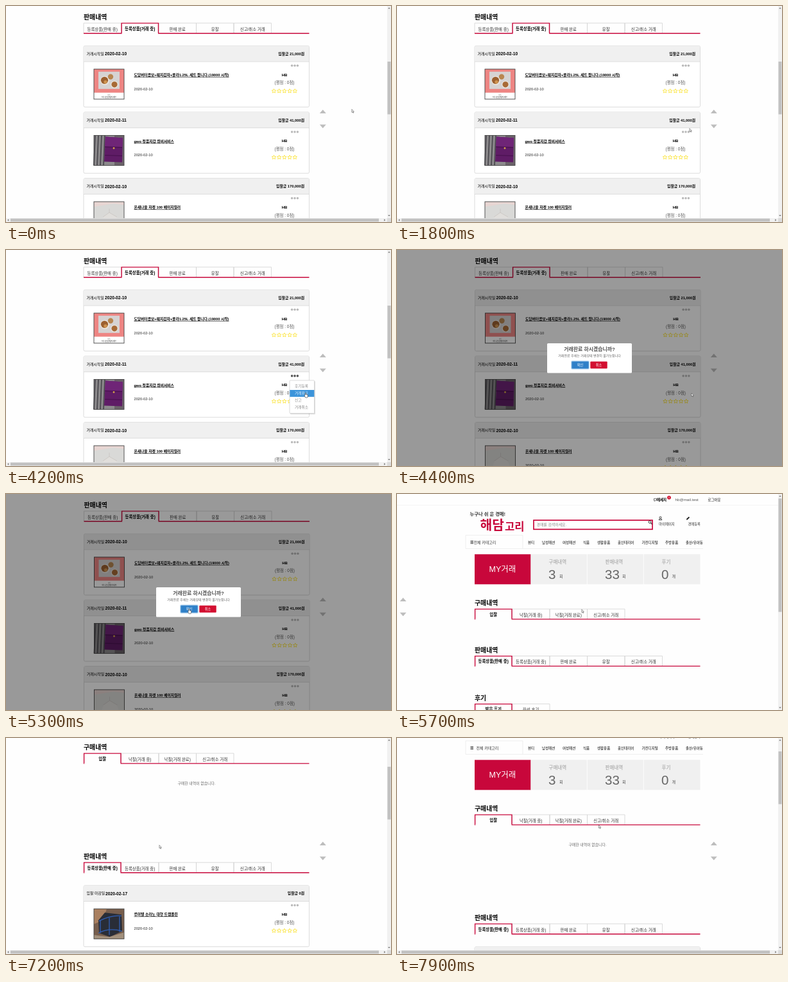
Write an HTML page that moves like this. It is 600 by 338 pixels and loops after 8000 ms.

```html
<!DOCTYPE html>
<html lang="ko">
<head>
<meta charset="utf-8">
<title>거래 완료</title>
<style>
  html, body { margin: 0; width: 100%; height: 100%; overflow: hidden; background: #fefefe; }
  svg { display: block; width: 100vw; height: 100vh; font-family: "Liberation Sans", "Noto Sans CJK KR", "Noto Sans CJK", sans-serif; }
  text { white-space: pre; }
</style>
</head>
<body>
<svg id="stage" viewBox="0 0 600 338" preserveAspectRatio="none"></svg>
<script>
const RED = '#c8073b';
const BOLD = 'font-weight="700"';
const MID = 'text-anchor="middle"';
const END = 'text-anchor="end"';
const LOOP = 8000;

// ---- drawing helpers (y is the visual middle of a text line) ----
const fill = color => `fill="${color}"`;
const text = (s, x, y, size, attrs = '') =>
  `<text x="${x}" y="${y + size * 0.37}" font-size="${size}" ${attrs}>${s}</text>`;
const rect = (x, y, w, h, color, attrs = '') =>
  `<rect x="${x}" y="${y}" width="${w}" height="${h}" fill="${color}" ${attrs}/>`;
const path = (d, color, attrs = '') => `<path d="${d}" fill="${color}" ${attrs}/>`;
const line = (d, color, width = 1) => path(d, 'none', `stroke="${color}" stroke-width="${width}"`);
const circle = (x, y, r, color, attrs = '') => `<circle cx="${x}" cy="${y}" r="${r}" fill="${color}" ${attrs}/>`;
const group = (id, body, attrs = '') => `<g id="${id}" ${attrs}>${body}</g>`;
const dots = (y, color) => [445.6, 450, 454.4].map(x => circle(x, y, 1.75, color)).join('');

function star(cx, cy, r) {
  const points = Array.from({ length: 10 }, (_, i) => {
    const a = i * Math.PI / 5, k = i % 2 ? r * 0.48 : r;
    return `${(cx + k * Math.sin(a)).toFixed(2)},${(cy - k * Math.cos(a)).toFixed(2)}`;
  });
  return `<polygon points="${points.join(' ')}" fill="#fffef2" stroke="#fae12a" stroke-width=".8"/>`;
}

// ---- page sections ----
function tabs(title, y, labels, active) {
  const left = i => 121 + i * 58.5;
  const bottom = y + 25.4;
  const cells = labels.map((label, i) => {
    const x = left(i), on = i === active;
    return (on ? '' : line(`M${x},${bottom}V${y + 9.5}H${x + 58.5}V${bottom}`, '#d2d2d2', 0.8)) +
      text(label, x + 29.2, y + (on ? 18 : 19), 6.4, `${MID} ${on ? BOLD : fill('#333')}`);
  }).join('');
  const x = left(active);
  return text(title, 121, y, 9.9, BOLD) + cells +
    line(`M121,${bottom}H${x + 0.6}V${y + 9.6}H${x + 58}V${bottom}H472.5`, RED, 1.4) +
    line(`M${x + 1.3},${bottom}H${x + 57.3}`, '#fefefe', 1.6);
}

const photos = {
  food: rect(0, 0, 47, 37, '#ee8583') +
    rect(7, 4, 33, 27, '#d6d3d3') +
    circle(17, 18, 7, '#ece6df') + circle(16.5, 17.5, 5.6, '#9c6030') + circle(18, 20, 2.6, '#cf9450') +
    circle(32, 24, 5.8, '#ece6df') + circle(32, 24, 4.6, '#a86a36') + circle(26, 12, 4.2, '#b98650') +
    rect(0, 37, 47, 10, '#fff') +
    text('· 세트 ·', 23.5, 40, 2.4, `${MID} fill="#777"`) +
    text('허니순살웨지세트', 23.5, 43.8, 3.2, `${MID} fill="#333"`),
  wallet: rect(0, 0, 47, 47, '#8c8a8c') +
    [2, 7, 12, 17].map(x => line(`M${x},0L${x - 2},47`, '#4c4a50', 1.8)).join('') +
    rect(32, 0, 15, 47, '#6b6269') +
    path('M18,2L45,4L44,42L16,41Z', '#5f1c66') +
    path('M18,2L45,4L44,18L17,17Z', '#6f2577') +
    line('M17,18L44,19M17,31L44,32', '#45104c', 1) + circle(31, 20, 1.4, '#d2a24a'),
  jacket: rect(0, 0, 47, 47, '#d9d9d7') +
    path('M0,0H47V5L30,3L0,8Z', '#e7d5d2') +
    path('M8,47L14,24L24,17L36,24L42,47Z', '#e0dedb') +
    line('M24,17V11M14,24L24,17L36,24', '#c9c4c0', 0.8),
  trampoline: rect(0, 0, 47, 47, '#775e4d') +
    path('M0,0H20L14,18L0,24Z', '#aa8060') +
    path('M7,18L17,6L43,9L44,35L25,44L8,38Z', '#292d37') +
    line('M7,38Q24,29 44,35M8,19Q26,10 43,11M10,18V38M24,14V41M40,12V36', '#315fb4', 1.3) +
    path('M0,41L24,44L47,37V47H0Z', '#a2907c')
};

function card(y, { label, dateX, date, price, title, photo }) {
  return rect(121, y, 351.5, 95.8, '#fff', 'rx="2" stroke="#d9d9d9" stroke-width=".9"') +
    rect(121.4, y + 0.4, 350.7, 24, '#f0f0f0') +
    line(`M121,${y + 24.7}H472.5`, '#d9d9d9', 0.9) +
    text(label, 125.5, y + 12.5, 5.9, 'font-weight="500"') +
    text(date, dateX, y + 12.5, 6.7, BOLD) +
    text(`입찰금 ${price}원`, 465, y + 12.5, 5.8, `${END} ${BOLD}`) +
    dots(y + 31, '#b9b9b9') +
    `<g transform="translate(137 ${y + 36.5})">${photos[photo]}${rect(0, 0, 47, 47, 'none', 'stroke="#444" stroke-width=".9"')}</g>` +
    text(title, 199.5, y + 45.5, 5.75, `${BOLD} text-decoration="underline"`) +
    text('2020-02-10', 199.5, y + 67.3, 5.7, fill('#222')) +
    text('HB', 434, y + 45, 6, `${MID} ${BOLD}`) +
    text('(평점 : 0점)', 434, y + 57.8, 6.4, `${MID} fill="#555"`) +
    [0, 1, 2, 3, 4].map(i => star(417.5 + i * 8.2, y + 70.8, 3.4)).join('');
}

const trading = (date, price, title, photo) => ({ label: '거래시작일', dateX: 154, date, price, title, photo });
const tradingCards = [
  trading('2020-02-10', '21,000', '도담버터콤보+웨지감자+콜라1.25L 세트 팝니다.(19000 시작)', 'food'),
  trading('2020-02-11', '41,000', 'gwo 정품지갑 뤼비서비스', 'wallet'),
  trading('2020-02-10', '170,000', '온새나울 자켓 100 베이지컬러', 'jacket')
];
const sellingCard = {
  label: '입찰 마감일', dateX: 155, date: '2020-02-17', price: '0',
  title: '루미텔 소라노 대형 트램폴린', photo: 'trampoline'
};
const saleTabs = ['등록상품(판매 중)', '등록상품(거래 중)', '판매 완료', '유찰', '신고/취소 거래'];

const userIcon = circle(0, -1.2, 1.5, 'none', 'stroke="#222" stroke-width=".8"') +
  line('M-2.3,2.6Q-2.3,.6 0,.6T2.3,2.6Z', '#222', 0.8);
const pencilIcon = path('M-2.6,2.6L-2.2,.8L1.2,-2.6L2.6,-1.2L-.8,2.2Z', '#222');
const shortcuts = (id, scale, iconY, labelY) => group(id,
  `<g transform="translate(410.5 ${iconY}) scale(${scale})">${userIcon}</g>` +
  `<g transform="translate(453.5 ${iconY}) scale(${scale})">${pencilIcon}</g>` +
  text('마이페이지', 408, labelY, 5.4, fill('#333')) + text('경매등록', 453.5, labelY, 5.3, fill('#333')));

const navItems = [['뷰티', 204], ['남성패션', 226], ['여성패션', 258], ['식품', 290], ['생활용품', 312],
  ['홈인테리어', 344], ['가전디지털', 381.5], ['주방용품', 418], ['출산/유아동', 450]];
const stats = [['구매내역', 3, '회', 253], ['판매내역', 33, '회', 351], ['후기', 0, '개', 428.5]];

const header =
  line('M0,17.5H600', '#f2f2f2', 0.8) +
  line('M400.5,7.2H404.5V10.2H402.5L401.3,11.4V10.2H400.5Z', '#333', 0.7) +
  text('메세지', 405, 9, 5.5, BOLD) + circle(424, 5.6, 2.9, '#d3122f') +
  text('0', 424, 5.6, 3.6, `${MID} fill="#fff"`) +
  text('hb@mail.test', 433.5, 9, 6.2, fill('#555')) + text('로그아웃', 484.5, 9, 5.4) +
  text('누구나 쉬 운 경매!', 113.5, 31.5, 7.3, `${BOLD} fill="#333"`) +
  text('해담', 129.5, 48.5, 20.3, `${BOLD} fill="${RED}"`) +
  text('고리', 168, 50.5, 16.6, `${BOLD} fill="${RED}"`) +
  rect(213, 41, 185, 14.3, '#fff', `stroke="${RED}" stroke-width="1.7"`) +
  text('경매를 검색하세요.', 217.5, 47.7, 5.9, fill('#888')) +
  circle(394, 43.8, 1.9, 'none', 'stroke="#222" stroke-width=".9"') + line('M395.4,45.2L397.5,47.3', '#222', 1.1) +
  shortcuts('shortcutsLoading', 1, 38, 47) + shortcuts('shortcutsLoaded', 1.4, 44, 58.5) +
  line('M107,85.5V64.5H196V85.5M107,85.5H477', '#eee', 0.9) +
  line('M114.5,73.6H119M114.5,75.5H119M114.5,77.4H119', '#222', 0.9) +
  group('category', text('전체 카테고리', 119.5, 75.3, 6, fill('#333'))) +
  navItems.map(([s, x]) => text(s, x, 75.5, 5.5, 'font-weight="500"')).join('') +
  rect(121, 94.3, 87.5, 47, RED) + text('MY거래', 164.5, 117.5, 12.5, `${MID} fill="#fff"`) +
  rect(208.5, 94.3, 264, 47, '#f0f0f0') + line('M296.3,94V141.5M384.3,94V141.5', '#fff', 0.8) +
  stats.map(([name, count, unit, unitX], i) => text(name, 236.5 + i * 88, 106, 7.5, fill('#999')) +
    text(count, 236 + i * 88, 125.5, 20.5, fill('#666')) +
    text(unit, unitX, 129, 6, fill('#444'))).join('');

const page = header +
  tabs('구매내역', 170.5, ['입찰', '낙찰(거래 중)', '낙찰(거래 완료)', '신고/취소 거래'], 0) +
  group('noPurchases', text('구매한 내역이 없습니다.', 297, 226.5, 5.9, `${MID} fill="#666"`)) +
  group('sales',
    group('salesTrading', tabs('판매내역', 244, saleTabs, 1) +
      tradingCards.map((c, i) => card(289 + i * 103.7, c)).join('') +
      group('activeDots', dots(423.6, '#555'))) +
    group('salesSelling', tabs('판매내역', 244, saleTabs, 0) + group('sellingCard', card(289.5, sellingCard))) +
    group('reviews', tabs('후기', 319, ['받은 후기', '작성 후기'], 0)));

// ---- fixed layers ----
const sideArrows = path('M-5,168L0,162.3L5,168Z', '#bdbdbd') + path('M-5,185.5L0,191.2L5,185.5Z', '#bdbdbd');

const hBar = rect(0, 332, 600, 6, '#f1f1f1') + rect(7, 332.6, 574, 4.8, '#c1c1c1') +
  path('M4.3,333.2V336.8L2.2,335Z', '#777') + path('M589.2,333.2V336.8L591.3,335Z', '#777');
const vBar = rect(594, 0, 6, 338, '#f1f1f1') + path('M595.2,4.3H598.8L597,2.2Z', '#777') +
  group('downArrow', path('M595.2,0H598.8L597,2.1Z', '#777')) +
  '<rect id="thumb" x="594.5" width="5" fill="#c1c1c1"/>' +
  group('corner', rect(594, 332, 6, 6, '#dcdcdc'));

const menuItems = ['후기등록', '거래완료', '신고', '거래취소'];
const menuText = (s, i, color) => text(s, 450, 213.3 + i * 11, 5.7, fill(color));
const menu = rect(443, 205.2, 39, 52, '#000', 'opacity=".13" rx="1"') +
  rect(442, 204, 38.5, 51.5, '#fff', 'stroke="#ccc" stroke-width=".7" rx="1"') +
  menuItems.map((s, i) => menuText(s, i, '#888')).join('') +
  group('highlight', rect(442.3, 219, 38, 10.8, '#3c94da') + menuText(menuItems[1], 1, '#e4f2ff'));

const dialog = rect(234, 146, 132, 46.5, '#fff', 'rx="1.6"') +
  text('거래완료 하시겠습니까?', 300, 155, 7.9, `${MID} fill="#545454" ${BOLD}`) +
  text('거래완료 후에는 거래상태 변경이 불가능합니다', 300, 165.3, 5, `${MID} fill="#666"`) +
  rect(271.2, 173.2, 28.6, 13.6, '#a9cdec', 'rx="1.8"') + rect(272.4, 174.4, 26.2, 11.2, '#2f80c8', 'rx="1"') +
  rect(301.3, 174.4, 26.4, 11.2, '#d30f30', 'rx="1"') +
  text('확인', 285.5, 180, 5.2, `${MID} fill="#fff"`) + text('취소', 314.5, 180, 5.2, `${MID} fill="#fff"`);

const arrow = path('M.4,.3V6.2L1.8,5L2.8,7.3L3.8,6.9L2.8,4.7H4.6Z', '#fff', 'stroke="#333" stroke-width=".6"');
const hand = path('M1.3,4V.8Q2,-.1 2.7,.8V3L5.3,3.7V6L4.6,8H1.8L0,5Q.3,4 1.3,4Z', '#fff', 'stroke="#333" stroke-width=".6"');

document.getElementById('stage').innerHTML =
  rect(0, 0, 600, 338, '#fefefe') + group('page', page) + group('sideArrows', sideArrows) +
  group('menu', menu) + group('hBar', hBar) + group('vBar', vBar) +
  group('overlay', rect(0, 0, 600, 338, '#000', 'opacity=".4"')) + group('dialog', dialog) +
  group('cursor', group('arrow', arrow, 'transform="translate(.6 .4) scale(.82)"') + group('hand', hand));

// ---- timeline ----
const MENU_OPEN = 2100, HOVER = 3100, CONFIRM = 4250, CLOSE = 5350, RELOAD = 5600, LOADED = 6000;
const cursorKeys = [[0, 538, 161], [850, 538, 161], [1800, 455, 191], [2000, 449, 194.5], [2600, 449, 195],
  [3300, 465, 223], [4200, 465, 223], [4400, 458, 223.5], [5150, 283, 179], [5500, 284, 179.5],
  [5700, 287, 180], [6300, 287, 180], [7200, 238, 167], [7900, 313.5, 135.5]];
const scrollKeys = [[6400, 0], [7100, 156], [7250, 156], [7900, 60]];

const $ = id => document.getElementById(id);
const show = (id, on) => { $(id).style.display = on ? '' : 'none'; };
const move = (id, x, y, more = '') => $(id).setAttribute('transform', `translate(${x} ${y})${more}`);
const clamp = v => Math.min(1, Math.max(0, v));

function at(keys, t) {
  const next = keys.findIndex(k => k[0] > t);
  if (next === 0) return keys[0].slice(1);
  if (next < 0) return keys[keys.length - 1].slice(1);
  const a = keys[next - 1], b = keys[next];
  const p = (t - a[0]) / (b[0] - a[0]), e = p * p * (3 - 2 * p);
  return a.slice(1).map((v, i) => v + (b[i + 1] - v) * e);
}

function render(t) {
  const reloaded = t >= RELOAD;
  const loading = reloaded && t < LOADED;
  const modal = t >= CONFIRM && t < CLOSE + 130;
  const scroll = reloaded ? at(scrollKeys, t)[0] : 324;

  move('page', modal ? 0.5 : 0, -scroll);
  move('sales', 0, loading ? 0 : 97.3);
  move('category', loading ? 0 : 4, 0);
  move('sideArrows', loading ? 9.5 : 493.8, 0);
  show('noPurchases', !loading);
  show('salesTrading', !reloaded);
  show('salesSelling', reloaded);
  show('sellingCard', !loading);
  show('reviews', loading);
  show('shortcutsLoading', loading);
  show('shortcutsLoaded', !loading);

  const menuOpen = t >= MENU_OPEN && t < CONFIRM;
  show('activeDots', menuOpen);
  show('menu', menuOpen);
  show('highlight', t >= HOVER);

  show('hBar', !modal && !loading);
  show('vBar', !modal);
  show('corner', !loading);
  move('downArrow', 0, loading ? 333.5 : 327);
  $('thumb').setAttribute('y', loading ? 7 : 6 + scroll / 4);
  $('thumb').setAttribute('height', loading ? 177.5 : 82.5);

  const opened = clamp((t - CONFIRM) / 140) * clamp((CLOSE + 130 - t) / 130);
  const scale = 0.7 + 0.3 * opened;
  $('overlay').setAttribute('opacity', opened);
  $('dialog').setAttribute('opacity', opened);
  move('dialog', 300 * (1 - scale), 169 * (1 - scale), ` scale(${scale})`);

  const pointing = (t >= HOVER && t < CONFIRM) || (t >= 5100 && t < CLOSE);
  move('cursor', ...at(cursorKeys, t));
  show('arrow', !pointing);
  show('hand', pointing);
}

function frame() {
  render(performance.now() % LOOP);
  requestAnimationFrame(frame);
}
frame();
</script>
</body>
</html>
```
